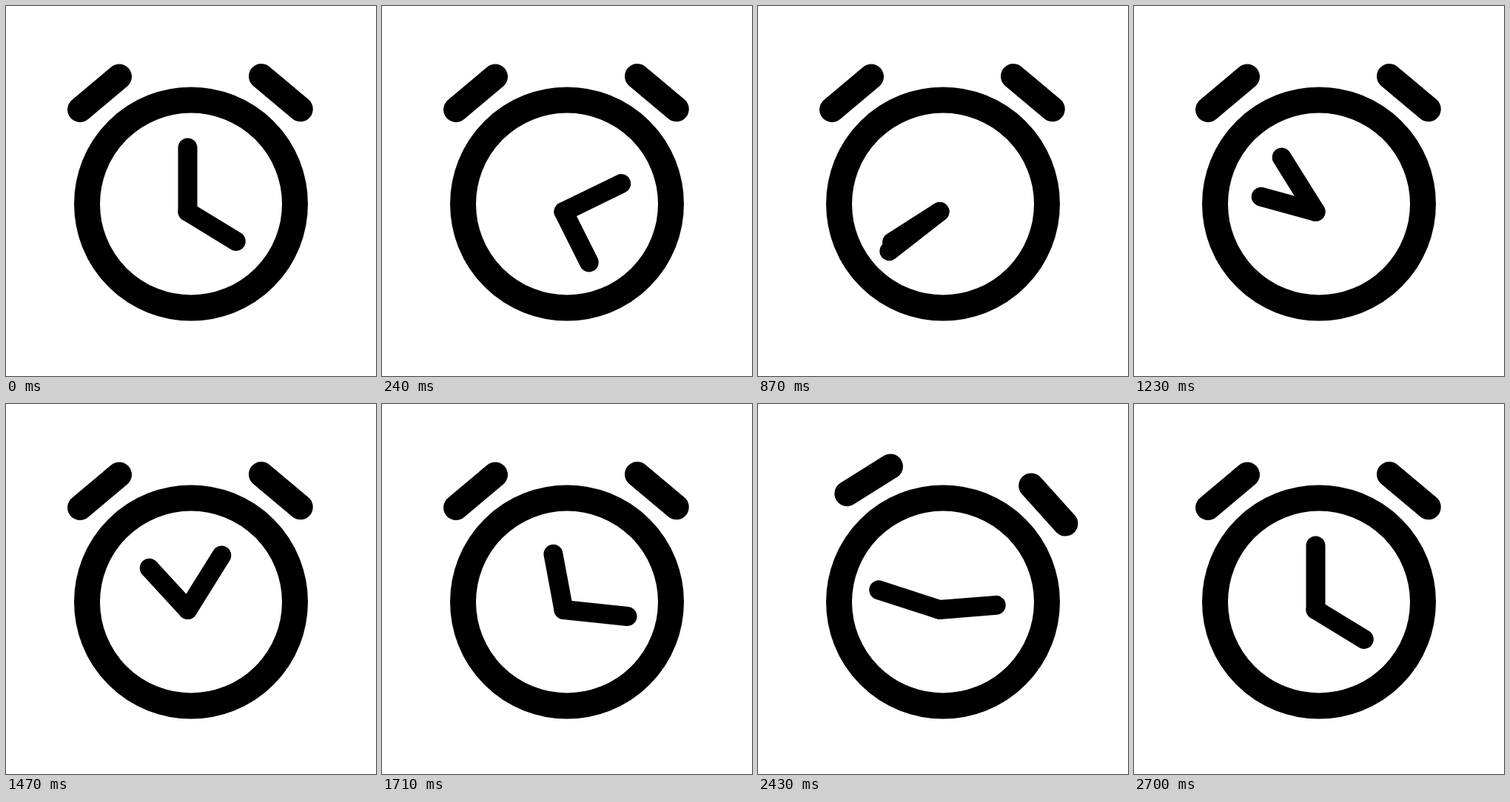
Write an HTML page that moves like this. It is 500 by 500 pixels and loops after 2730 ms.

```html
<!DOCTYPE html>
<html lang="en">
<head>
<meta charset="utf-8">
<title>Alarm clock</title>
<style>
  html, body { margin: 0; height: 100%; overflow: hidden; background: #fff; }
  svg { display: block; width: 100%; height: 100%; }
</style>
</head>
<body>
<svg viewBox="0 0 500 500" fill="none" stroke="#000" stroke-linecap="round">
  <circle cx="250" cy="267.5" r="140.5" stroke-width="35"/>
  <path id="bells" stroke-width="34" d="M100 140L153 95.5M345 95L397.8 139.3"/>
  <g stroke-width="26">
    <path id="minute" d="M245.5 278v-86.5"/>
    <path id="hour" d="M245.5 278v-76.5"/>
  </g>
</svg>
<script>
const STEP = 30, STEPS = 91, TURN = 90;
// The bells swing through these angles, five steps apart
const SWING_START = 65, SWING_STEPS = 5;
const swing = [0, 10, -10, 10, -10, 0];

const [bells, minute, hour] =
  ['bells', 'minute', 'hour'].map(id => document.getElementById(id));

function rotate(part, angle, x, y) {
  part.setAttribute('transform', `rotate(${angle} ${x} ${y})`);
}

function bellAngle(step) {
  const position = Math.max(0, (step - SWING_START) / SWING_STEPS);
  const i = Math.min(Math.floor(position), swing.length - 2);
  const u = position - i;
  return swing[i] + (swing[i + 1] - swing[i]) * u * u * (3 - 2 * u);
}

function draw(now) {
  const step = Math.floor(now / STEP) % STEPS;
  const turn = 360 * step / TURN;
  rotate(minute, 2 * turn, 245.5, 278);
  rotate(hour, 121.4 + turn, 245.5, 278);
  rotate(bells, bellAngle(step), 246, 277.5);
}

const start = performance.now();
function tick() {
  draw(performance.now() - start);
  requestAnimationFrame(tick);
}
tick();
</script>
</body>
</html>
```
